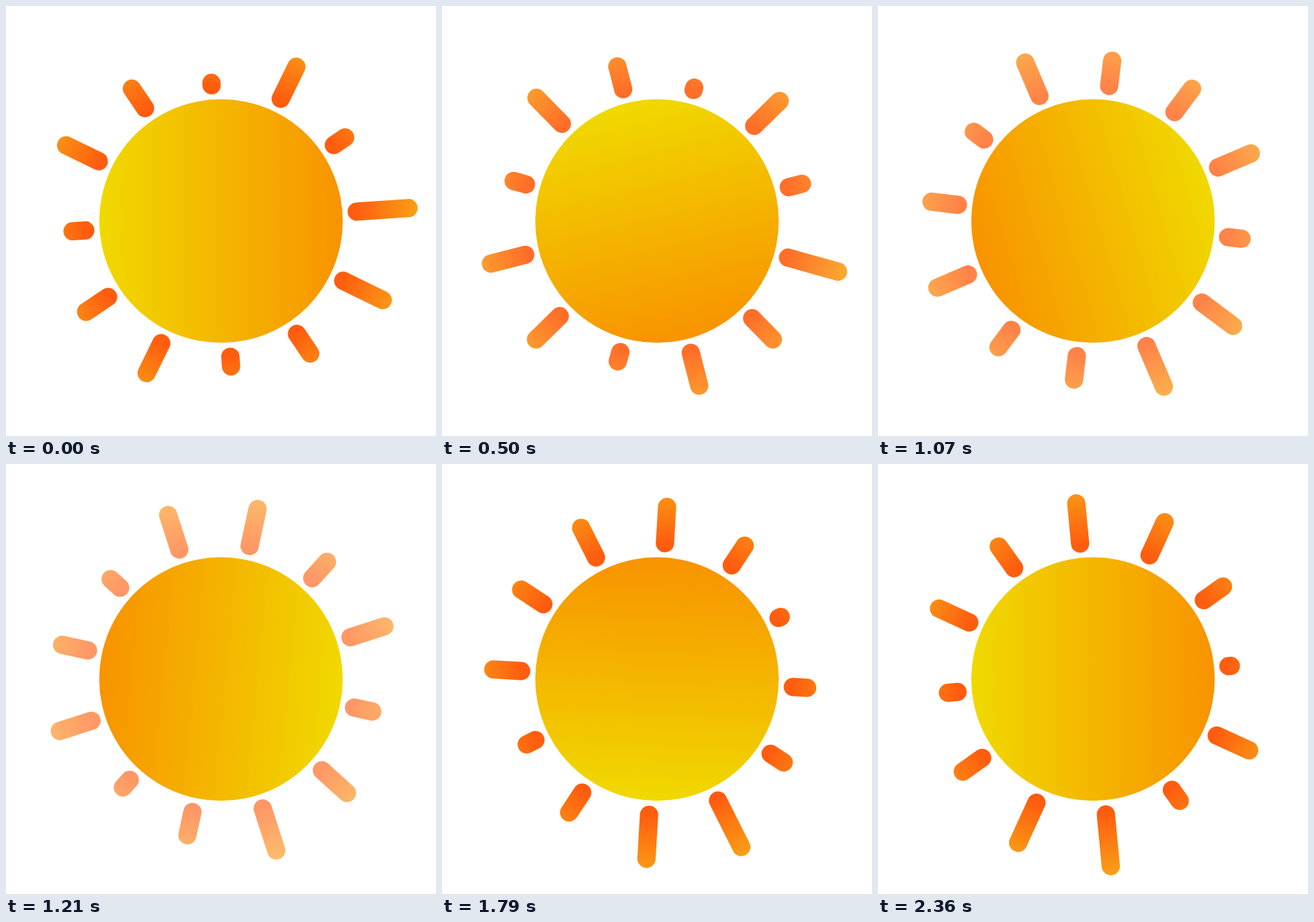
Animation, 640 px wide and 640 px high, one loop 2430 ms. Source, as an HTML page with a canvas:

```html
<!DOCTYPE html>
<html lang="en">
<head>
<meta charset="utf-8">
<title>Sun</title>
<style>
html, body { margin: 0; height: 100%; overflow: hidden; background: #fff; }
canvas { display: block; }
</style>
</head>
<body>
<canvas id="stage" width="640" height="640"></canvas>
<script>
const ctx = document.getElementById('stage').getContext('2d');
const LOOP = 2430, STEPS = 34, LAST = STEPS - 1;
const SUN_RADIUS = 181.2, RAY_START = 202.5, PULSE_SPEED = 7;

// Rays clockwise: resting length, then the step and size of the pulse
const rays = [
  [77.3, 16.5, -28], [65.5, 7, -21.5], [35.3, 8.3, 23], [14.4, 13, 31],
  [49.5, 25, -8], [39.5, 8.5, 23], [19, 29.5, 62], [54],
  [35, 19.5, 38], [3.6, 15, 40], [53, 26, -35], [20.2, 20.7, 37]
];

// Smooth bump from 0 to 1 and back around a middle step
function pulse(step, mid, half) {
  const d = (step - mid) / half;
  return Math.abs(d) < 1 ? Math.cos(d * Math.PI / 2) ** 2 : 0;
}

function gradient(g, from, to) {
  g.addColorStop(0, from);
  g.addColorStop(1, to);
  return g;
}

const rayPaint = gradient(ctx.createRadialGradient(0, 0, 200, 0, 0, 300), '#ff5200', '#f8a008');

function drawSun(step) {
  const a = Math.PI + step / LAST * 2 * Math.PI;
  const x = SUN_RADIUS * Math.cos(a), y = SUN_RADIUS * Math.sin(a);
  ctx.fillStyle = gradient(ctx.createLinearGradient(x, y, -x, -y), '#f0d900', '#f89300');
  ctx.beginPath();
  ctx.arc(0, 0, SUN_RADIUS, 0, 2 * Math.PI);
  ctx.fill();
}

function drawRays(step) {
  // A quick start, then steady turning
  const turn = -3.95 + 2.652 * step + (1 - Math.exp(-step));
  ctx.globalAlpha = .94 - .1 * pulse(step, 7, 4) - .34 * pulse(step, 17, 5);
  ctx.strokeStyle = rayPaint;
  ctx.lineWidth = 27.2;
  ctx.lineCap = 'round';
  ctx.rotate(turn * Math.PI / 180);
  for (const [length, mid = 0, change = 0] of rays) {
    const grown = change * pulse(step, mid, Math.abs(change) / PULSE_SPEED);
    ctx.beginPath();
    ctx.moveTo(RAY_START, 0);
    ctx.lineTo(RAY_START + length + grown, 0);
    ctx.stroke();
    ctx.rotate(Math.PI / 6);
  }
}

function draw() {
  const t = performance.now() % LOOP;
  const step = Math.min(LAST, Math.floor(t / LOOP * STEPS + .1));
  ctx.clearRect(0, 0, 640, 640);
  ctx.save();
  ctx.translate(320, 320);
  drawSun(step);
  drawRays(step);
  ctx.restore();
  requestAnimationFrame(draw);
}
draw();
</script>
</body>
</html>
```
